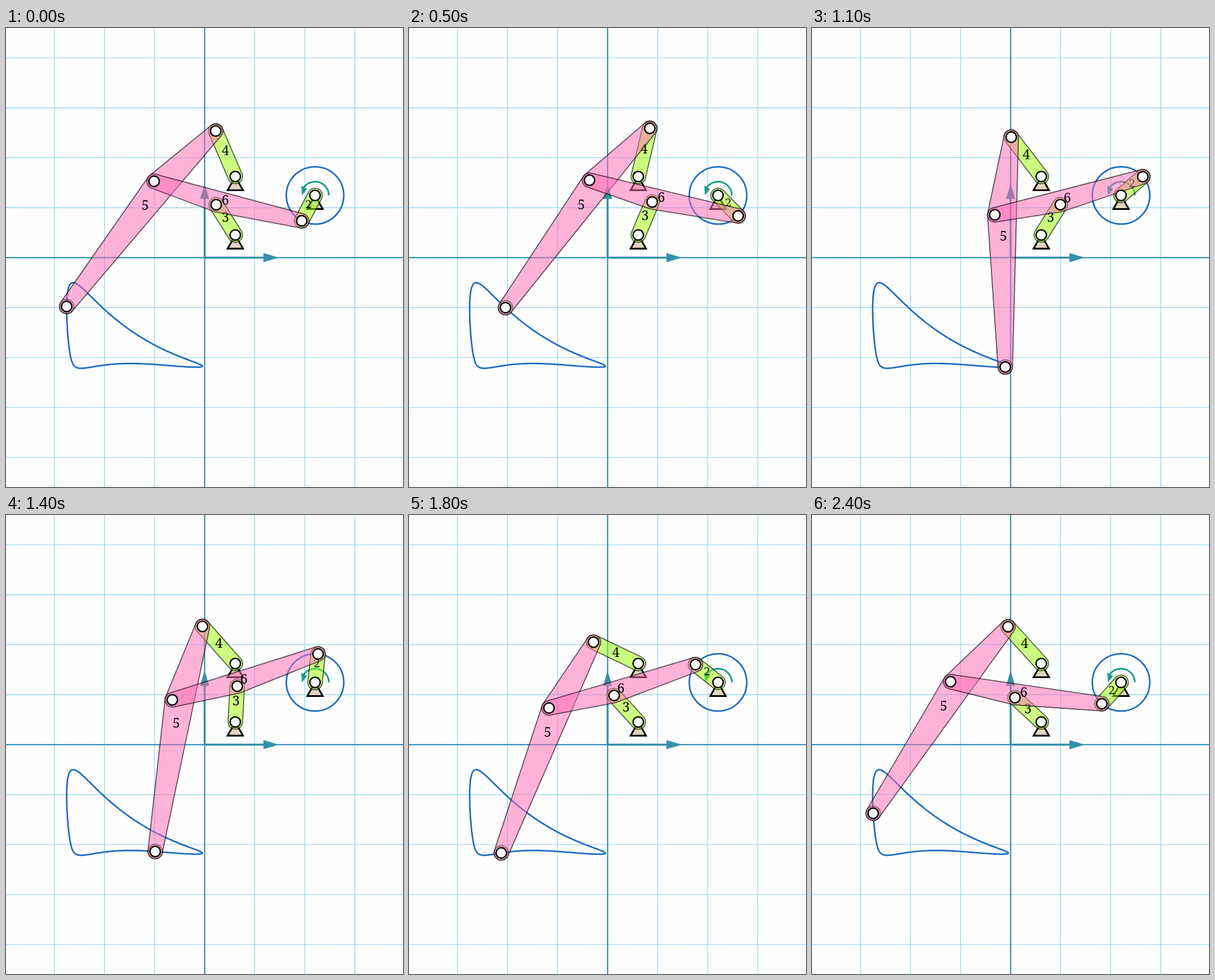
Animation of 695x805 px, one loop 2500 ms. Source, as an HTML page:

```html
<!DOCTYPE html>
<html lang="en">
<head>
<meta charset="utf-8">
<title>Walking linkage</title>
<style>
  html, body { margin: 0; width: 100%; height: 100%; overflow: hidden; background: #fefefe; }
  svg { display: block; width: 695px; height: 805px; }
  text { text-anchor: middle; font: 23px "Noto Serif", "Liberation Serif", serif; }
  .grid { stroke: #87ceeb; stroke-width: 1.1; }
  .axis { stroke: #2088b8; stroke-width: 2; }
  .trace { fill: none; stroke: #216fc0; stroke-width: 2.8; }
  .arrow { fill: #3690aa; }
  .shaft { stroke: #3690aa; stroke-width: 3.5; }
  .support { fill: #e0d5be; stroke: #000; stroke-width: 3; }
  .turn { fill: none; stroke: #169f88; stroke-width: 3; }
  .head { fill: #169f88; }
  .link { stroke: #000; stroke-opacity: .62; stroke-width: 1.8; }
  .rocker { fill: rgba(153, 255, 0, .5); }
  .coupler { fill: rgba(255, 105, 180, .5); }
  .foot { fill: rgba(200, 100, 110, .3); stroke: #000; stroke-opacity: .45; stroke-width: 1.5; }
  .pin { fill: #fff; stroke: #000; stroke-width: 2.5; }
</style>
</head>
<body>
<svg id="stage" viewBox="0 0 695 805"></svg>
<script>
const svg = document.getElementById('stage');
const DEG = Math.PI / 180;
const LOOP = 2500, STEP = 100;
const ORIGIN = { x: 347.7, y: 402.8 }, CELL = 87.63;
const LINK_RADIUS = 12.7, CRANK = 50.3;

const crankPivot = { x: 541, y: 293.6 };
const upperPivot = { x: 401.4, y: 260.5 };
const lowerPivot = { x: 401.4, y: 363 };
const pivots = [crankPivot, upperPivot, lowerPivot];

function add(tag, attrs) {
  const node = document.createElementNS('http://www.w3.org/2000/svg', tag);
  set(node, attrs);
  svg.append(node);
  return node;
}

function set(node, attrs) {
  for (const key in attrs) node.setAttribute(key, attrs[key]);
}

const polar = (p, r, a) => ({ x: p.x + r * Math.cos(a), y: p.y + r * Math.sin(a) });
const direction = (p, q) => Math.atan2(q.y - p.y, q.x - p.x);
const centroid = points => ({
  x: points.reduce((sum, p) => sum + p.x, 0) / points.length,
  y: points.reduce((sum, p) => sum + p.y, 0) / points.length
});

// Joint at distance r from p and s from q, on the left when looking from p to q.
function joint(p, r, q, s) {
  const d = Math.hypot(q.x - p.x, q.y - p.y);
  const bend = Math.acos((r * r + d * d - s * s) / (2 * r * d));
  return polar(p, r, direction(p, q) - bend);
}

function solve(turn) {
  const crank = polar(crankPivot, CRANK, -(242.4 + 360 * turn) * DEG);
  const knee = joint(lowerPivot, 62.8, crank, 152.4);
  const elbow = polar(knee, 116.2, direction(knee, crank) + 189.95 * DEG);
  const hip = joint(elbow, 139.3, upperPivot, 86.9);
  const foot = polar(elbow, 267.6, direction(elbow, hip) + 164.15 * DEG);
  return { crank, knee, elbow, hip, foot };
}

// Rounded outline around points given clockwise.
function outline(points) {
  return points.map((p, i) => {
    const q = points[(i + 1) % points.length];
    const normal = direction(p, q) - Math.PI / 2;
    const a = polar(p, LINK_RADIUS, normal), b = polar(q, LINK_RADIUS, normal);
    const start = i ? `A${LINK_RADIUS} ${LINK_RADIUS} 0 0 1 ` : 'M';
    const first = i < points.length - 1 ? '' : closing(points);
    return `${start}${a.x} ${a.y}L${b.x} ${b.y}${first}`;
  }).join('') + 'Z';
}

function closing(points) {
  const end = polar(points[0], LINK_RADIUS, direction(points[0], points[1]) - Math.PI / 2);
  return `A${LINK_RADIUS} ${LINK_RADIUS} 0 0 1 ${end.x} ${end.y}`;
}

const line = (cls, x1, y1, x2, y2) => add('line', { class: cls, x1, y1, x2, y2 });

function drawScene() {
  for (let i = -4; i <= 4; i++) {
    const x = ORIGIN.x + i * CELL, y = ORIGIN.y + i * CELL;
    line('grid', x, 0, x, 805);
    line('grid', 0, y, 695, y);
  }
  line('axis', ORIGIN.x, 0, ORIGIN.x, 805);
  line('axis', 0, ORIGIN.y, 695, ORIGIN.y);

  const steps = 400;
  const path = Array.from({ length: steps }, (_, i) => solve(i / steps).foot);
  add('path', { class: 'trace', d: 'M' + path.map(p => `${p.x.toFixed(2)} ${p.y.toFixed(2)}`).join('L') + 'Z' });
  add('circle', { class: 'trace', cx: crankPivot.x, cy: crankPivot.y, r: CRANK });

  for (const angle of [0, -90]) {
    const transform = `translate(${ORIGIN.x} ${ORIGIN.y}) rotate(${angle})`;
    add('path', { class: 'shaft', d: 'M0 0H105', transform });
    add('path', { class: 'arrow', d: 'M103-8L130 0L103 8Z', transform });
  }
  for (const p of pivots)
    add('path', { class: 'support', d: 'M0 0L13.5 24H-13.5Z', transform: `translate(${p.x} ${p.y})` });

  const transform = `translate(${crankPivot.x} ${crankPivot.y})`;
  add('path', { class: 'turn', d: 'M24.2 0A24.2 24.2 0 0 0-20.5-12.8', transform });
  add('path', { class: 'head', d: 'M-24-17L-14-11L-23 0Z', transform });
}

function makeLink(label, kind) {
  const shape = add('path', { class: `link ${kind}` });
  const text = add('text', {});
  text.textContent = label;
  const small = label === '2';
  if (small) text.style.font = '18px "DejaVu Serif", "Noto Serif", serif';
  const drop = small ? 6.5 : 8.2;
  return (points, dx, dy) => {
    const c = centroid(points);
    set(shape, { d: outline(points) });
    set(text, { x: c.x + dx, y: c.y + dy + drop });
  };
}

drawScene();
const crankLink = makeLink('2', 'rocker');
const lowerLink = makeLink('3', 'rocker');
const upperLink = makeLink('4', 'rocker');
const legLink = makeLink('5', 'coupler');
const couplerLink = makeLink('6', 'coupler');
const footRing = add('circle', { class: 'foot', r: LINK_RADIUS });
const pins = Array.from({ length: 8 }, () => add('circle', { class: 'pin', r: 9.1 }));

const place = (node, p) => set(node, { cx: p.x, cy: p.y });
// Labels of upright bars sit higher than those of level bars.
const lift = (p, q) => -7.2 * Math.sin(direction(p, q)) ** 2;

function render(turn) {
  const { crank, knee, elbow, hip, foot } = solve(turn);
  crankLink([crankPivot, crank], 0.5, lift(crankPivot, crank) - 1.2);
  lowerLink([lowerPivot, knee], -0.4, lift(lowerPivot, knee) + 1);
  upperLink([upperPivot, hip], 0, lift(upperPivot, hip) + 0.7);
  legLink([elbow, hip, foot], -0.5, 7.5 * Math.sin(direction(elbow, foot) - 108 * DEG) - 3.7);
  couplerLink([crank, knee, elbow], 2.4, -3 - 3.7 * Math.sin(direction(knee, crank)));
  place(footRing, foot);
  [...pivots, crank, knee, elbow, hip, foot].forEach((p, i) => place(pins[i], p));
}

const startTime = performance.now();
function tick() {
  const time = (performance.now() - startTime) % LOOP;
  render(Math.floor(time / STEP) * STEP / LOOP);
  requestAnimationFrame(tick);
}
tick();
</script>
</body>
</html>
```
